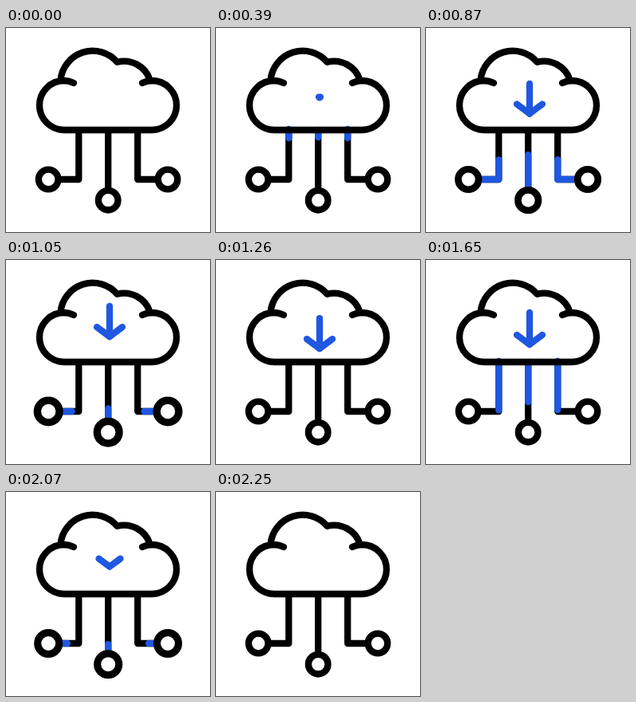
An HTML page with a canvas that plays this animation: 256 by 256 pixels, repeating every 2280 ms.

```html
<!DOCTYPE html>
<html lang="en">
<head>
<meta charset="utf-8">
<title>Cloud download</title>
<style>
html, body { margin: 0; width: 100%; height: 100%; overflow: hidden; background: #fff; }
canvas { display: block; width: 100vw; height: 100vh; }
</style>
</head>
<body>
<canvas id="stage"></canvas>
<script>
const LOOP = 2280, STEP = 30, BLACK = '#000', BLUE = '#1f57e0', WIDTH = 8.3;
const canvas = document.getElementById('stage');
const ctx = canvas.getContext('2d');
const dpr = window.devicePixelRatio || 1;
canvas.width = canvas.height = 256 * dpr;

const wires = [
  [[91.3, 127], [91.3, 190], [66, 190]],
  [[128.2, 128], [128.2, 200]],
  [[165.2, 127], [165.2, 190], [190, 190]]
];
const nodes = [[53.2, 190], [128.2, 216.2], [203, 190]];
const cloud = new Path2D(
  'M85 69A31 31 0 0 0 73 66A31 31 0 0 0 73 128H183A31 31 0 0 0 183 66A31 31 0 0 0 171 69' +
  'M68.5 65A40.5 40.5 0 0 1 139.5 42.8A34 34 0 0 1 180.5 65');

// The flow runs twice; the arrow's exit mirrors its entry.
const FLOW = { start: 330, period: 990, run: 475, tail: 334 };
const MID = 1290;
const tipKeys = [[330, 86], [600, 96.5], [690, 103], [870, 107.5], [930, 106], [1080, 95], [1290, 112]];
const topKeys = [[600, 92], [690, 81.5], [870, 70], [930, 66], [1080, 57], [1290, 74]];

const clamp = v => Math.max(0, Math.min(1, v));
const smooth = v => v * v * (3 - 2 * v);

function tween(keys, t) {
  if (t <= keys[0][0]) return keys[0][1];
  for (let i = 1; i < keys.length; i++) {
    const [t0, a] = keys[i - 1], [t1, b] = keys[i];
    if (t <= t1) return a + (b - a) * smooth((t - t0) / (t1 - t0));
  }
  return keys[keys.length - 1][1];
}

function line(points, color, cap) {
  ctx.strokeStyle = color;
  ctx.lineCap = cap;
  ctx.beginPath();
  points.forEach(([x, y], i) => i ? ctx.lineTo(x, y) : ctx.moveTo(x, y));
  ctx.stroke();
}

// Part of a polyline between two fractions of its length.
function trim(points, from, to) {
  const lens = points.slice(1).map((p, i) => Math.hypot(p[0] - points[i][0], p[1] - points[i][1]));
  const total = lens.reduce((a, b) => a + b);
  const out = [];
  let pos = 0;
  lens.forEach((len, i) => {
    const a = clamp((from * total - pos) / len), b = clamp((to * total - pos) / len);
    const at = k => points[i].map((v, j) => v + (points[i + 1][j] - v) * k);
    if (b > a) {
      if (!out.length) out.push(at(a));
      out.push(at(b));
    }
    pos += len;
  });
  return out;
}

function drawArrow(t) {
  const u = t < MID ? t : 2 * MID - t;
  const grow = smooth(clamp((u - 360) / 200));
  if (grow <= 0) return;
  const x = 130, tip = tween(tipKeys, u);
  const dx = 16 * grow, dy = 12 * grow;
  line([[x - dx, tip - dy], [x, tip], [x + dx, tip - dy]], BLUE, 'round');
  if (u >= 570) line([[x, tip], [x, Math.min(tip, tween(topKeys, u))]], BLUE, 'round');
}

function draw(t) {
  ctx.setTransform(canvas.width / 256, 0, 0, canvas.height / 256, 0, 0);
  ctx.fillStyle = '#fff';
  ctx.fillRect(0, 0, 256, 256);
  ctx.lineWidth = WIDTH;
  ctx.lineJoin = 'round';

  const age = t < FLOW.start + FLOW.period ? t - FLOW.start : t - FLOW.start - FLOW.period;
  const head = clamp(age / FLOW.run), tail = clamp((age - FLOW.tail) / FLOW.run);
  for (const w of wires) line(w, BLACK, 'butt');
  if (head > tail) for (const w of wires) line(trim(w, tail, head), BLUE, 'round');

  const pulse = Math.sin(Math.PI * clamp((age - 470) / 400)) ** 2;
  const scale = 1 + 0.15 * pulse;
  ctx.strokeStyle = BLACK;
  ctx.lineWidth = WIDTH * scale;
  for (const [x, y] of nodes) {
    ctx.beginPath();
    ctx.arc(x, y, 12.3 * scale, 0, 2 * Math.PI);
    ctx.fill();
    ctx.stroke();
  }

  ctx.lineWidth = WIDTH;
  ctx.lineCap = 'round';
  ctx.stroke(cloud);
  drawArrow(t);
}

const begin = performance.now();
function tick() {
  const t = (performance.now() - begin) % LOOP;
  draw(Math.floor(t / STEP) * STEP);
  requestAnimationFrame(tick);
}
tick();
</script>
</body>
</html>
```
